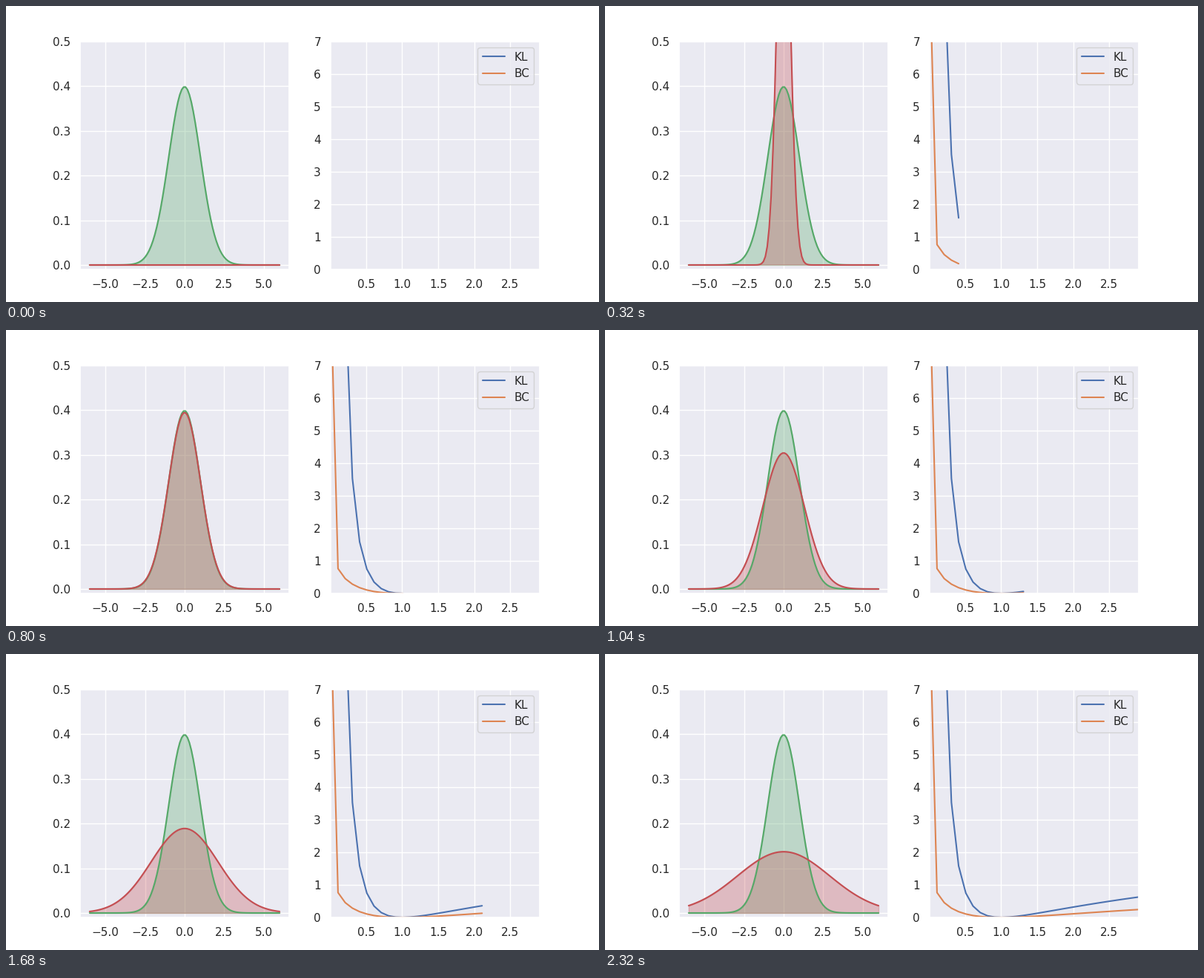
Write a matplotlib script that moves like this. It is 800x400 px and loops after 2.4 s.

```python
import matplotlib.pyplot as plt
import numpy as np
from matplotlib.animation import FuncAnimation

BLUE, ORANGE, GREEN, RED = "#4c72b0", "#dd8452", "#55a868", "#c44e52"
FRAMES = 30

plt.rcParams.update({
    "font.family": "DejaVu Sans", "font.size": 12, "text.color": ".15",
    "figure.facecolor": "white", "axes.facecolor": "#eaeaf2",
    "axes.edgecolor": "white", "axes.linewidth": 1.25,
    "axes.axisbelow": True, "axes.grid": True,
    "grid.color": "white", "grid.linewidth": 1,
    "lines.linewidth": 1.5, "lines.solid_capstyle": "round",
    "patch.linewidth": 1,
    "xtick.labelsize": 11, "ytick.labelsize": 11, "legend.fontsize": 11,
    "xtick.color": ".15", "ytick.color": ".15",
    "xtick.major.size": 6, "ytick.major.size": 6,
    "xtick.bottom": False, "ytick.left": False,
})


def normal(x, sigma):
    return np.exp(-0.5 * (x / sigma) ** 2) / (sigma * np.sqrt(2 * np.pi))


x = np.linspace(-6, 6, 100)
sigmas = 0.01 + 0.1 * np.arange(FRAMES)
base = normal(x, 1)

# Divergences between the unit normal and N(0, sigma)
kl = np.log(sigmas) + 0.5 / sigmas ** 2 - 0.5
bc = np.array([-np.log(np.sum(np.sqrt(base * normal(x, s))) * (x[1] - x[0]))
               for s in sigmas])

fig, (left, right) = plt.subplots(1, 2, figsize=(8, 4), dpi=100)
fig.subplots_adjust(left=0.125, right=0.9, bottom=0.11, top=0.88, wspace=0.2)

left.set(xlim=(-6.6, 6.6), ylim=(-0.01, 0.5),
         xticks=np.arange(-5, 5.1, 2.5), yticks=np.arange(6) / 10)
right.set(xlim=(sigmas[0], sigmas[-1]), ylim=(0, 7),
          xticks=np.arange(1, 6) / 2, yticks=range(8))


def filled_curve(y, color):
    line, = left.plot(x, y, color=color)
    return line, left.fill_between(x, y, color=color, alpha=0.3)


filled_curve(base, GREEN)
bell, area = filled_curve(0 * x, RED)

kl_line, = right.plot([], [], color=BLUE, label="KL")
bc_line, = right.plot([], [], color=ORANGE, label="BC")
right.legend(loc="upper right")


def update(i):
    y = normal(x, sigmas[i])
    bell.set_data(x, y)
    area.set_verts([np.column_stack([np.r_[x[0], x, x[-1]], np.r_[0, y, 0]])])
    kl_line.set_data(sigmas[:i + 1], kl[:i + 1])
    bc_line.set_data(sigmas[:i + 1], bc[:i + 1])
    return bell, area, kl_line, bc_line


anim = FuncAnimation(fig, update, frames=FRAMES, interval=80, repeat=True,
                     init_func=lambda: update(0))
plt.show()
```
